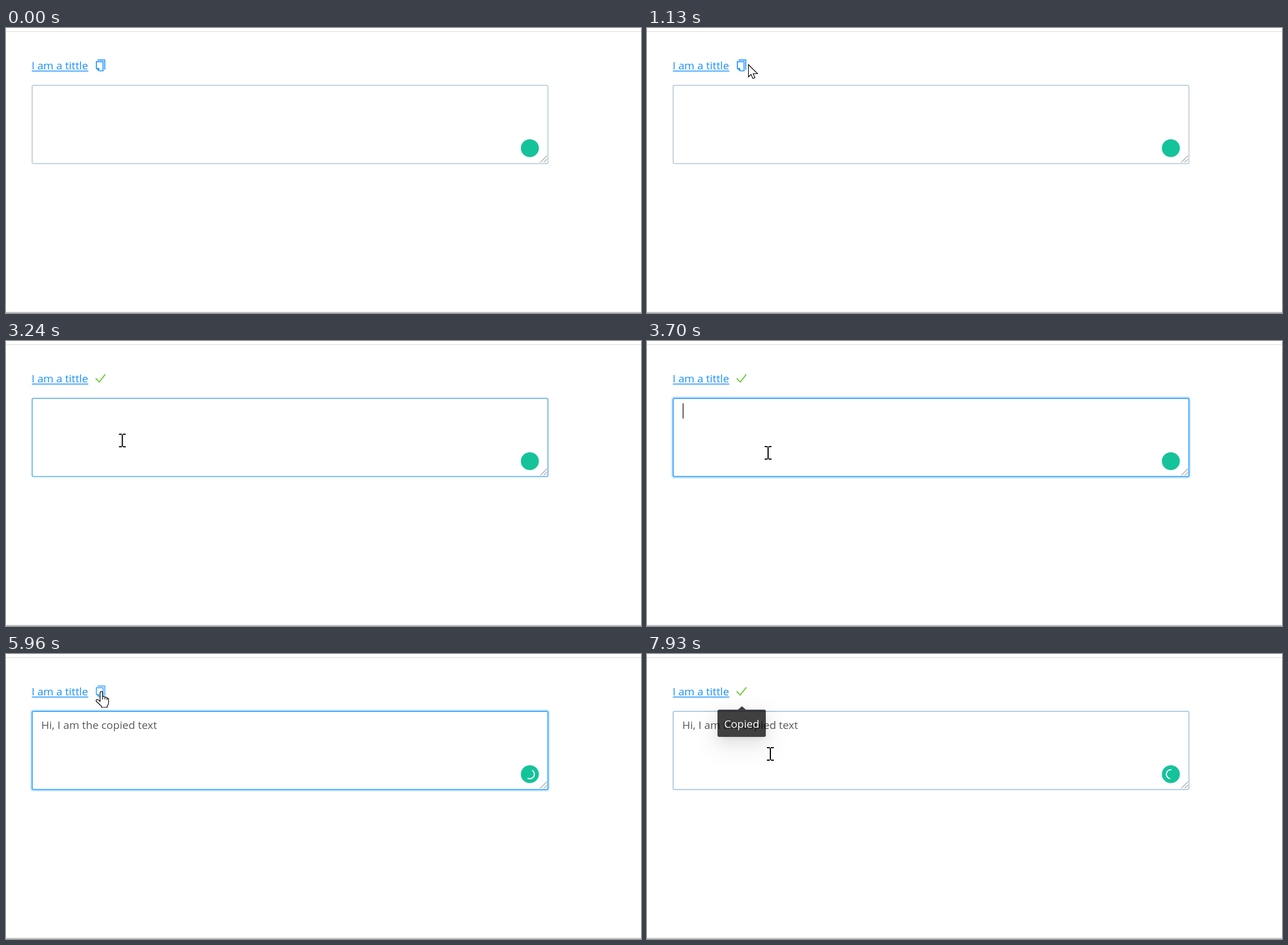
Recreate the animation shown at these times as an HTML page. Size 1117 by 502 pixels, loop 8 s.

```html
<!DOCTYPE html>
<html lang="en">
<head>
<meta charset="utf-8">
<title>Copy link demo</title>
<style>
  html, body { margin: 0; width: 100%; height: 100%; overflow: hidden; background: #fff; }
  svg { position: absolute; left: 0; top: 0; }
  svg, #tip { font: 19px "Open Sans", "Noto Sans", sans-serif; }
  #tip {
    position: absolute; top: 97.5px; height: 48.5px; line-height: 51px; border-radius: 3px;
    color: #fff; background: rgba(0, 0, 0, .75); text-align: center; transform-origin: 50% -5px;
    box-shadow: 0 4.5px 9px -6px rgba(0, 0, 0, .12), 0 9px 24px rgba(0, 0, 0, .08),
      0 13.5px 42px 12px rgba(0, 0, 0, .05);
  }
  #tip::before {
    content: ""; position: absolute; left: 50%; top: -6px; margin-left: -7px;
    border: solid transparent; border-width: 0 7px 6px; border-bottom-color: rgba(0, 0, 0, .75);
  }
</style>
</head>
<body>
<svg width="1117" height="502" fill="none">
  <path d="M0 6.4H1117" stroke="#e0e0e0" stroke-width="1.4"/>
  <path d="M0 501H1117" stroke="#c4c4c4" stroke-width="2"/>
  <text x="45" y="73" fill="#1890ff">I am a tittle</text>
  <path d="M45.5 75.8H144.7" stroke="#1890ff" stroke-width="1.6"/>
  <g stroke-width="1.7">
    <path id="copy" d="M161 56.4H173.7V73.4M158.9 59.4H170.7V75.5H164L158.9 70.8ZM159 71.3H163.2V75.5"/>
    <path id="check" d="M157.8 65.8L164 72.3L174.6 58.7" stroke="#52c41a"/>
  </g>
  <rect id="ring" x="43.8" y="98.9" width="911.4" height="142" rx="4" stroke="#1890ff" stroke-opacity=".2" stroke-width="2.6"/>
  <rect id="box" x="46" y="101" width="907.3" height="137.8" rx="2.5" stroke-width="2"/>
  <path d="M940 236.5L951.5 225M946 236.5L951.5 231" stroke="#666"/>
  <text id="pasted" x="62" y="132" fill="#595959">Hi, I am the copied text</text>
  <path id="caret" d="M63.5 110V136.5" stroke="#222" stroke-width="1.5"/>
  <circle cx="921.5" cy="211.7" r="15.8" fill="#15c39a"/>
  <path id="spinner" d="M921.5 203.7a8 8 0 0 1 0 16" stroke="#fff" stroke-width="2"/>
</svg>
<div id="tip"></div>
<svg width="1117" height="502">
  <circle id="spot" cx="-1.3" cy="-1" r="17" fill="rgba(250,240,0,.55)"/>
  <g id="cursor" fill="#fff" stroke="#000" stroke-width="1.2">
    <path id="arrow" d="M.5 .5V22L5 17.8L8.3 25L11.8 23.5L8.7 16.5H16.5Z"/>
    <path id="beam" stroke-width="2" d="M-6 -11H-1M1 -11H6M0 -10.5V10.5M-6 11H-1M1 11H6"/>
    <path id="hand" d="M-2.5 15V2a2.2 2.2 0 0 1 4.4 0V9q3-1 4 1q3-.5 3.6 1.4q3 0 3 2.6V20q0 3-2.5 5.5V28H0V26L-9 17.5q-1.5-2.5 1-3.4q2-.3 5.5 3.4ZM2 9V14M6 10V14M9.6 11.5V15"/>
  </g>
</svg>
<script>
const LOOP = 8000;
const el = id => document.getElementById(id);
const show = (id, on) => el(id).style.display = on ? "" : "none";
const within = (v, a, b) => v >= a && v < b;
const ramp = (t, start, span) => Math.min(1, Math.max(0, (t - start) / span));
const pulse = (t, on, off, span) => ramp(t, on, span) - ramp(t, off, span);

// Pointer moves: from time, until time, to x, y
const moves = [
  [70, 590, 338, 259], [770, 1060, 178, 64], [1140, 1220, 168, 66], [2220, 2370, 172, 90],
  [3010, 3300, 213, 197], [3850, 4170, 213, 186], [4310, 5090, 116, 93],
  [5180, 5960, 168, 66], [7680, 7930, 217, 176]
];
const clicks = [2070, 3300, 6980];

function pointer(t) {
  let x = 925, y = 490;
  for (const [from, until, toX, toY] of moves) {
    const k = ramp(t, from, until - from);
    x += (toX - x) * k;
    y += (toY - y) * k;
  }
  return [x, y];
}

function drawPointer(t, x, y, onIcon) {
  const hand = onIcon || (within(x, 45, 145) && within(y, 55, 78));
  const inBox = within(x, 45, 954) && within(y, 101, 239);
  show("cursor", t >= 70);
  show("hand", hand);
  show("beam", inBox);
  show("arrow", !hand && !inBox);
  show("spot", clicks.some(click => within(t, click, click + 250)));
  for (const id of ["cursor", "spot"]) el(id).setAttribute("transform", `translate(${x} ${y})`);
}

function drawField(t) {
  const hover = .15 * (1 - ramp(t, 1140, 150)) + .5 * pulse(t, 850, 950, 100) + ramp(t, 7850, 300);
  const blue = Math.min(1, hover + pulse(t, 3080, 7090, 250));
  el("box").setAttribute("stroke", `rgb(${217 - 153 * blue},${217 - 48 * blue},${217 + 38 * blue})`);
  el("ring").style.opacity = pulse(t, 3300, 6980, 200);
  show("caret", within(t, 3300, 3850));
  show("pasted", t >= 3850);
  show("spinner", t >= 4310);
  el("spinner").setAttribute("transform", `rotate(${30 + (t - 5960) * .628} 921.5 211.7)`);
}

function drawTip(t, copied) {
  const tip = el("tip"), width = copied ? 85 : 67;
  const shown = pulse(t, 1290, 3080, 150) + ramp(t, 6040, 150);
  tip.textContent = copied ? "Copied" : "Copy";
  tip.style.width = width + "px";
  tip.style.left = 166.5 - width / 2 + "px";
  tip.style.opacity = shown;
  tip.style.transform = `scale(${.8 + .2 * shown})`;
}

function draw(t) {
  const [x, y] = pointer(t);
  const onIcon = within(x, 156, 176) && within(y, 55, 78);
  const copied = within(t, 2290, 5200) || t >= 7370;
  show("check", copied);
  show("copy", !copied);
  el("copy").setAttribute("stroke", onIcon ? "#40a9ff" : "#1890ff");
  drawPointer(t, x, y, onIcon);
  drawField(t);
  drawTip(t, copied);
}

const begin = performance.now();
(function tick() {
  draw((performance.now() - begin) % LOOP);
  requestAnimationFrame(tick);
})();
</script>
</body>
</html>
```
